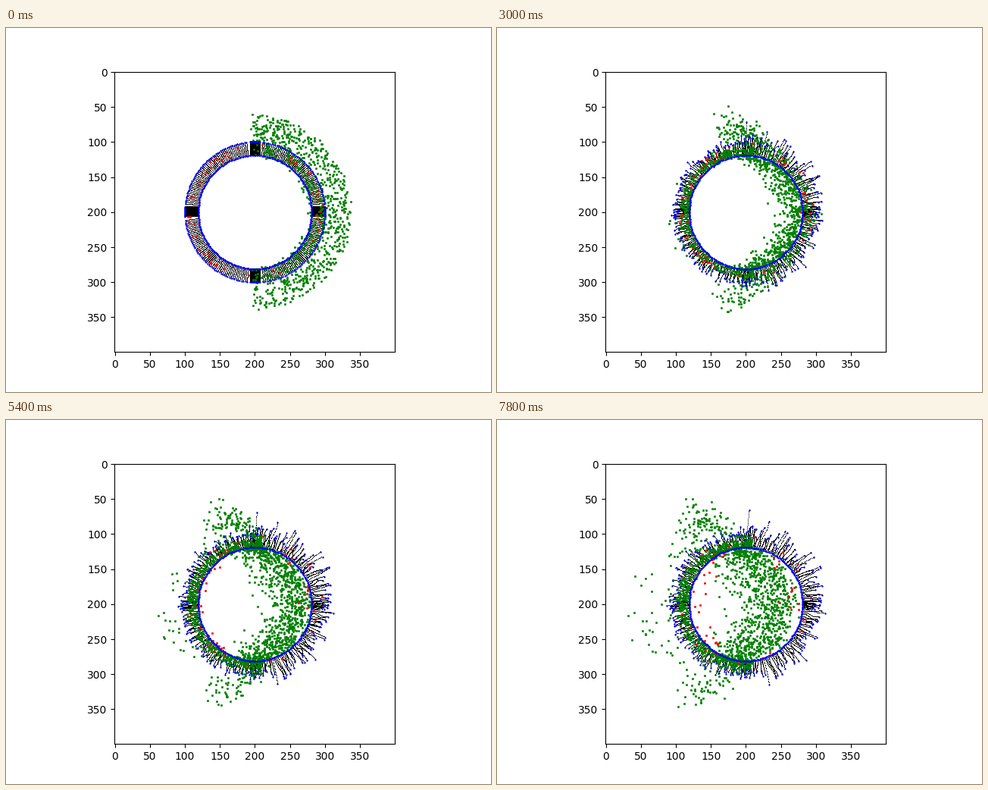
A matplotlib script for the animation above (8 s loop, 640 by 480 pixels).

```python
import numpy as np
import matplotlib.pyplot as plt
from matplotlib.animation import FuncAnimation

FRAMES, STEP_MS = 40, 200
CENTER = np.array([200.0, 200.0])
R_IN, R_OUT, BEADS = 81, 100, 26
WIND = 2.1
rng = np.random.default_rng(12)


def polar(r, a):
    return CENTER + np.stack([r * np.cos(a), r * np.sin(a)], axis=-1)


def make_hairs():
    """Bead positions and angle of every hair, and the beads' place along it."""
    frac = np.linspace(0, 1, BEADS)
    radii = R_IN + (R_OUT - R_IN) * frac
    angles, beads = [], []
    for quarter in range(4):
        axis = quarter * np.pi / 2
        along = np.array([np.cos(axis), np.sin(axis)])
        across = np.array([-along[1], along[0]])
        # parallel bundle on the axis, then a fan up to the next axis
        for k in range(-7, 8):
            beads.append(CENTER + radii[:, None] * along + k * across)
            angles.append(axis + k / 90)
        for deg in np.arange(6.5, 84, 1.5):
            a = axis + np.radians(deg)
            beads.append(polar(radii, np.full(BEADS, a)))
            angles.append(a)
    return np.array(beads), np.array(angles), frac


beads0, angle, frac = make_hairs()
n_hair = len(angle)
outward = np.stack([np.cos(angle), np.sin(angle)], axis=-1)
side = np.stack([-outward[:, 1], outward[:, 0]], axis=-1)
is_right = outward[:, 0] > -0.05
top_right = (outward[:, 1] < -0.6) & is_right
reach = np.where(is_right, rng.normal(2, 8.5, n_hair), rng.normal(-1, 3.5, n_hair))
reach *= 0.4 + 0.6 * np.abs(np.sin(2 * angle)) ** 0.5
reach = np.clip(reach + top_right * rng.uniform(-3, 11, n_hair), -12, 22)
reach[np.argmin(np.abs(angle - 1.5 * np.pi))] = 33
curl = rng.normal(0, 2.2, n_hair)
bend = rng.normal(0, 0.9, n_hair)
lean = rng.uniform(0, 0.3, n_hair) * np.clip(-outward[:, 0], 0, 1)
jitter = np.cumsum(rng.normal(0, 0.3, (FRAMES, n_hair, 2)), axis=0)
jitter -= jitter[0]


def hairs_at(t):
    grow = 1 - np.exp(-t / 7)
    stretch = (reach * grow + lean * t)[:, None] * frac
    sway = grow * (curl[:, None] * frac ** 1.6
                   + bend[:, None] * np.sin(2 * np.pi * frac))
    return (beads0 + stretch[..., None] * outward[:, None]
            + sway[..., None] * side[:, None]
            + frac[None, :, None] * jitter[t][:, None])


def make_green(n_start=900, n_left=560, n_right=420):
    """Paths of the drifting dots; late ones are NaN until they appear."""
    r = np.sqrt(rng.uniform(79 ** 2, 140 ** 2, n_start))
    start = polar(r, rng.uniform(-np.pi / 2, np.pi / 2, n_start))
    start[:, 0] -= rng.uniform(0, 6, n_start)
    left = polar(rng.uniform(79, 92, n_left),
                 rng.uniform(0.5 * np.pi, 1.5 * np.pi, n_left))
    right = polar(rng.uniform(78, 84, n_right),
                  rng.uniform(-0.5 * np.pi, 0.5 * np.pi, n_right))
    pos = np.vstack([start, left, right])
    n = len(pos)
    birth = np.r_[np.zeros(n_start), 2 + rng.exponential(11, n_left),
                  rng.uniform(1, 32, n_right)]
    speed = rng.uniform(0.6, 3.0, n)
    held = 0.11 * speed
    quick = (birth > 0) & (rng.random(n) < 0.13)
    held[quick] = 1.9

    path = np.empty((FRAMES, n, 2))
    for t in range(FRAMES):
        alive = birth <= t
        path[t] = np.where(alive[:, None], pos, np.nan)
        dx, dy = (pos - CENTER).T
        r = np.hypot(dx, dy)
        inside = r < R_IN
        hair_left = ~inside & (r < R_OUT) & (dx < 10)
        vx = np.where(inside, -speed, np.where(hair_left, -held, -WIND))
        pull = np.where(~inside & (dx > 0),
                        1.4 * np.abs(2 * dx * dy) / r ** 2, 0)
        step = np.stack([vx - pull * dx / r, -pull * dy / r], axis=-1)
        spread = np.where(hair_left, 0.4, np.where(inside, 0.8, 1.5))
        step += rng.normal(0, 1, (n, 2)) * spread[:, None]
        pos = pos + step * alive[:, None]
    return path


def make_red(n=54):
    a = rng.uniform(0, 2 * np.pi, n)
    r = rng.uniform(86, 99, n)
    pace = rng.uniform(0.05, 1.4, n) * (0.15 + 0.85 * np.abs(np.cos(a)))
    wait = rng.uniform(5, 18, n)
    drift = np.cumsum(rng.normal(0, 0.4, (FRAMES, n, 2)), axis=0)
    drift -= drift[0]
    t = np.arange(FRAMES)[:, None]
    return polar(r - pace * np.clip(t - wait, 0, None), a[None]) + drift


green, red = make_green(), make_red()

fig, ax = plt.subplots(figsize=(6.4, 4.8), dpi=100)
ax.set_aspect("equal")
ax.set_xlim(-0.5, 399.5)
ax.set_ylim(399.5, -0.5)
ax.set_xticks(range(0, 400, 50))
ax.set_yticks(range(0, 400, 50))

hair_dots, = ax.plot([], [], ",", color="black")
green_dots, = ax.plot([], [], "o", color="green", ms=1.8, mew=0.4)
red_dots, = ax.plot([], [], "o", color="red", ms=1.8, mew=0.4)
ring = polar(R_IN, np.linspace(0, 2 * np.pi, 361))
ax.plot(*np.round(ring).T, "o", color="blue", ms=1.3, mew=0.3)
tip_dots, = ax.plot([], [], "o", color="blue", ms=1.3, mew=0.3)


def draw(t):
    beads = hairs_at(t)
    green_dots.set_data(*green[t].T)
    red_dots.set_data(*red[t].T)
    hair_dots.set_data(*beads.reshape(-1, 2).T)
    tip_dots.set_data(*beads[:, -1].T)
    return green_dots, hair_dots, red_dots, tip_dots


anim = FuncAnimation(fig, draw, frames=FRAMES, interval=STEP_MS,
                     repeat=True, repeat_delay=0)
plt.show()
```
